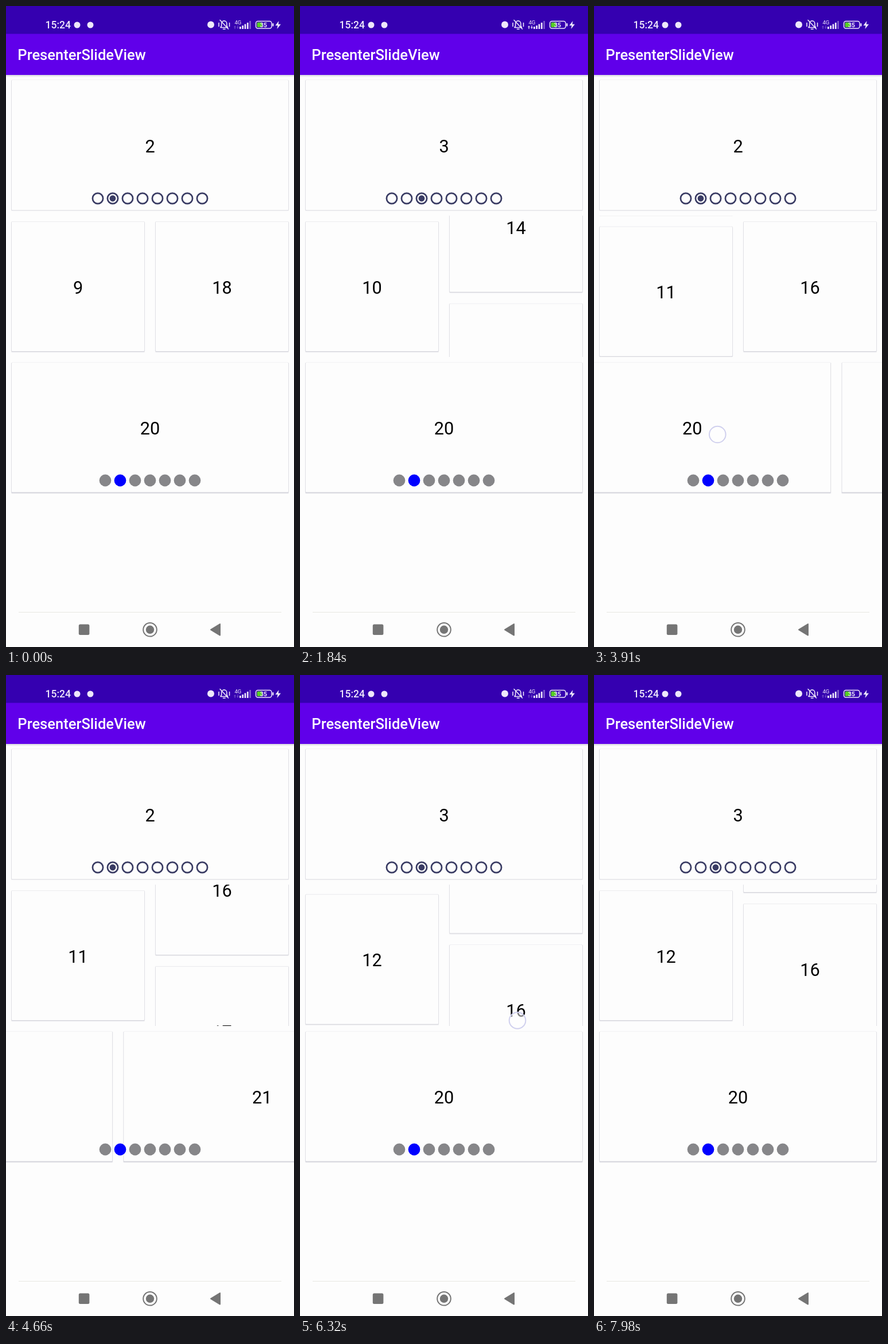
These frames come from a looping animation (502x1116 px, 8000 ms). An HTML page:

```html
<!DOCTYPE html>
<html lang="en">
<head>
<meta charset="utf-8">
<title>Slide view</title>
<style>
  html, body { margin: 0; width: 100%; height: 100%; overflow: hidden; background: #fdfdfd; }
  svg { display: block; width: 100%; height: 100%; font-family: Roboto, "Noto Sans", sans-serif; }
  .num { font-size: 30.7px; text-anchor: middle; fill: #000; }
</style>
</head>
<body>
<svg id="stage" viewBox="0 0 502 1116">
  <defs>
    <linearGradient id="fade" x1="0" y1="0" x2="0" y2="1">
      <stop offset="0" stop-color="#303060" stop-opacity=".2"/>
      <stop offset="1" stop-color="#303060" stop-opacity="0"/>
    </linearGradient>
  </defs>
  <rect width="502" height="1116" fill="#fdfdfd"/>
  <g id="pagers"></g>
  <g id="dots"></g>
  <circle id="touch" r="14.3" fill="#fff" fill-opacity=".5" stroke="#d0d0ee" stroke-width="2"/>

  <rect y="120" width="502" height="4" fill="url(#fade)"/>
  <rect y="48" width="502" height="72" fill="#6000ea"/>
  <rect width="502" height="48.5" fill="#3500b0"/>
  <text x="20.3" y="94" font-size="25.56" font-weight="500" fill="#fff">PresenterSlideView</text>

  <g id="status" fill="#eee8fb">
    <text x="68.5" y="39" font-size="17.5" font-weight="500">15:24</text>
    <circle cx="124" cy="33" r="5.5"/>
    <circle cx="147" cy="33" r="5.5"/>
    <circle cx="357" cy="32.5" r="6"/>
    <g fill="none" stroke="#eee8fb" stroke-width="1.6" stroke-linecap="round" stroke-linejoin="round">
      <path d="M374 37.5h12.5l-1.7-3v-4a4.6 4.6 0 0 0-9.200 0v4zM378.500 40.300h3.500"/>
      <path d="M371 29.500v6M389.500 29.500v6M373 24.500l14.500 15.500"/>
    </g>
    <text x="398.500" y="31.500" font-size="9.500">4G</text>
    <path id="arrows" d="M397 37l2-3 2 3h-1.300v3h-1.400v-3zM402 37l2 3 2-3h-1.300v-3h-1.400v3z"/>
    <path d="M407 36h2.700v4h-2.700zM411.300 34h2.700v6h-2.700zM415.600 31.500h2.700v8.500h-2.700zM419.900 29h2.700v11h-2.700z"/>
    <path d="M424.200 26h2.700v14h-2.700z" opacity=".4"/>
    <rect x="435.500" y="26.500" width="27.500" height="12.500" rx="3.500" fill="none" stroke="#eee8fb" stroke-width="1.500"/>
    <rect x="437.500" y="28.500" width="9" height="8.500" rx="1.500" fill="#55cf22"/>
    <rect x="464.300" y="30" width="2.200" height="5.500" rx="1"/>
    <text x="449" y="36.600" font-size="10.500" font-weight="700" text-anchor="middle">35</text>
    <path d="M475.500 26l-6 8h4l-1 6 6.500-8.300h-4.300z"/>
  </g>

  <path d="M22 1055.500H480" stroke="#e8e8e2"/>
  <g fill="#757575">
    <rect x="126.800" y="1076.500" width="18.600" height="18.600" rx="2.500"/>
    <circle cx="251" cy="1085.800" r="11.800" fill="none" stroke="#757575" stroke-width="2"/>
    <circle cx="251" cy="1085.800" r="7.200"/>
    <path d="M357 1085.800L373 1076V1095.600Z" stroke="#757575" stroke-width="2" stroke-linejoin="round"/>
  </g>
</svg>
<script>
const LOOP = 8000, SLIDE = 340;
const $ = id => document.getElementById(id);

function el(parent, tag, attrs) {
  const node = document.createElementNS("http://www.w3.org/2000/svg", tag);
  for (const key in attrs) node.setAttribute(key, attrs[key]);
  return parent.appendChild(node);
}

// A key is [time, page, settle]; settle marks a decelerating move towards that page.
const slide = (start, from, to) => [[start, from], [start + SLIDE, to, true]];

function pageAt(keys, t) {
  if (t <= keys[0][0]) return keys[0][1];
  for (let i = 1; i < keys.length; i++) {
    const [t1, v1, settle] = keys[i];
    if (t >= t1) continue;
    const [t0, v0] = keys[i - 1];
    const u = (t - t0) / (t1 - t0);
    return v0 + (v1 - v0) * (settle ? 1 - (1 - u) ** 2 : u);
  }
  return keys[keys.length - 1][1];
}

const pagers = {
  top: {
    x: 0, y: 120, w: 502, h: 245, cardY: 129, cardH: 226.500, depth: .7, base: 255,
    first: 1, count: 8,
    keys: [...slide(1040, 2, 3), [2530, 3], [2620, 2.930], [2740, 2.720], [3080, 2, true],
      ...slide(5750, 2, 3)]
  },
  left: {
    x: 0, y: 365, w: 251, h: 246, cardY: 375.500, cardH: 225.500, depth: 1.400, base: 500.500,
    first: 9, count: 5, vertical: true,
    keys: [...slide(1235, 9, 10), ...slide(3635, 10, 11), ...slide(6037, 11, 12)]
  },
  right: {
    x: 251, y: 365, w: 251, h: 246, cardY: 375.500, cardH: 225.500, depth: 1.400, base: 500.500,
    first: 14, count: 5, vertical: true,
    keys: [...slide(360, 18, 19), ...slide(1760, 19, 20), ...slide(3170, 20, 21),
      ...slide(4570, 21, 22), [5600, 22], [5720, 21.500], [6000, 21, true],
      [6130, 21], [6320, 20.618], [6345, 20.570], [6600, 20, true], ...slide(7745, 20, 21)]
  },
  bottom: {
    x: 0, y: 611, w: 502, h: 246, cardY: 621, cardH: 225.500, depth: 1.900, base: 746,
    first: 19, count: 7,
    keys: [[3760, 20], [3910, 20.157], [3990, 20.300], [4270, 21, true],
      [4500, 21], [4640, 20.700], [4960, 20, true]]
  }
};

function makeCard(parent, p) {
  const g = el(parent, "g", {});
  const x = p.x + 10, w = p.w - 20, { cardY: y, cardH: h, depth: d } = p;
  const layer = (side, top, drop, alpha) => el(g, "rect", {
    x: x - side, y: y - top, width: w + 2 * side, height: h + top + drop,
    rx: 1.500, fill: "#28284e", "fill-opacity": alpha
  });
  layer(1.200, .6, d + .9, .05);
  layer(.7, .3, d, .08);
  layer(.3, 0, d * .6, .1);
  el(g, "rect", { x, y, width: w, height: h, rx: 1, fill: "#fdfdfd" });
  const text = el(g, "text", { class: "num", x: x + w / 2, y: p.base });
  return { g, text };
}

for (const [name, p] of Object.entries(pagers)) {
  const clip = el(document.querySelector("defs"), "clipPath", { id: "clip-" + name });
  el(clip, "rect", { x: p.x, y: p.y, width: p.w, height: p.h });
  const group = el($("pagers"), "g", { "clip-path": `url(#clip-${name})` });
  p.cards = [makeCard(group, p), makeCard(group, p)];
}

for (let i = 0; i < 8; i++) {
  el($("dots"), "circle", {
    cx: 160 + 26 * i, cy: 335, r: 9.100, fill: "#fdfdfd", stroke: "#3a3c64", "stroke-width": 2.700
  });
}
const mark = el($("dots"), "circle", { cy: 335, r: 5.400, fill: "#3a3c64" });
const fills = Array.from({ length: 7 }, (_, i) =>
  el($("dots"), "circle", { cx: 173 + 26 * i, cy: 826, r: 10.400 }));

function drawPager(p, t) {
  const pos = pageAt(p.keys, t), page = Math.floor(pos);
  p.pos = pos;
  p.cards.forEach(({ g, text }, i) => {
    const shift = (page + i - pos) * (p.vertical ? p.h : p.w);
    g.setAttribute("transform", p.vertical ? `translate(0 ${shift})` : `translate(${shift} 0)`);
    text.textContent = p.first + (page + i - p.first) % p.count;
  });
}

// The finger follows the page it drags.
function fingerAt(t) {
  const { top, right, bottom } = pagers;
  const within = (a, b) => t >= a && t < b;
  if (within(2510, 2740)) return [186 + (3 - top.pos) * 502, 259];
  if (within(3740, 3990)) return [295 + (20 - bottom.pos) * 502, 746];
  if (within(4480, 4640)) return [180 + (21 - bottom.pos) * 502, 746];
  if (within(5540, 5720)) return [363, 421 + (22 - right.pos) * 246];
  if (within(6100, 6345)) return [379, 507 + (21 - right.pos) * 246];
  return null;
}

function draw(t) {
  for (const p of Object.values(pagers)) drawPager(p, t);

  const topPage = (t >= 1040 && t < 2740) || t >= 5750 ? 3 : 2;
  mark.setAttribute("cx", 160 + 26 * (topPage - 1));
  const bottomPage = t >= 3990 && t < 4640 ? 21 : 20;
  fills.forEach((dot, i) => dot.setAttribute("fill", i === bottomPage - 19 ? "#00f" : "#868689"));

  const finger = fingerAt(t);
  $("touch").setAttribute("visibility", finger ? "visible" : "hidden");
  if (finger) $("touch").setAttribute("transform", `translate(${finger})`);
  $("arrows").setAttribute("opacity", t >= 1040 && t < 3320 ? .9 : .3);
}

function tick() {
  draw((performance.now() - start) % LOOP);
  requestAnimationFrame(tick);
}
const start = performance.now();
tick();
</script>
</body>
</html>
```
